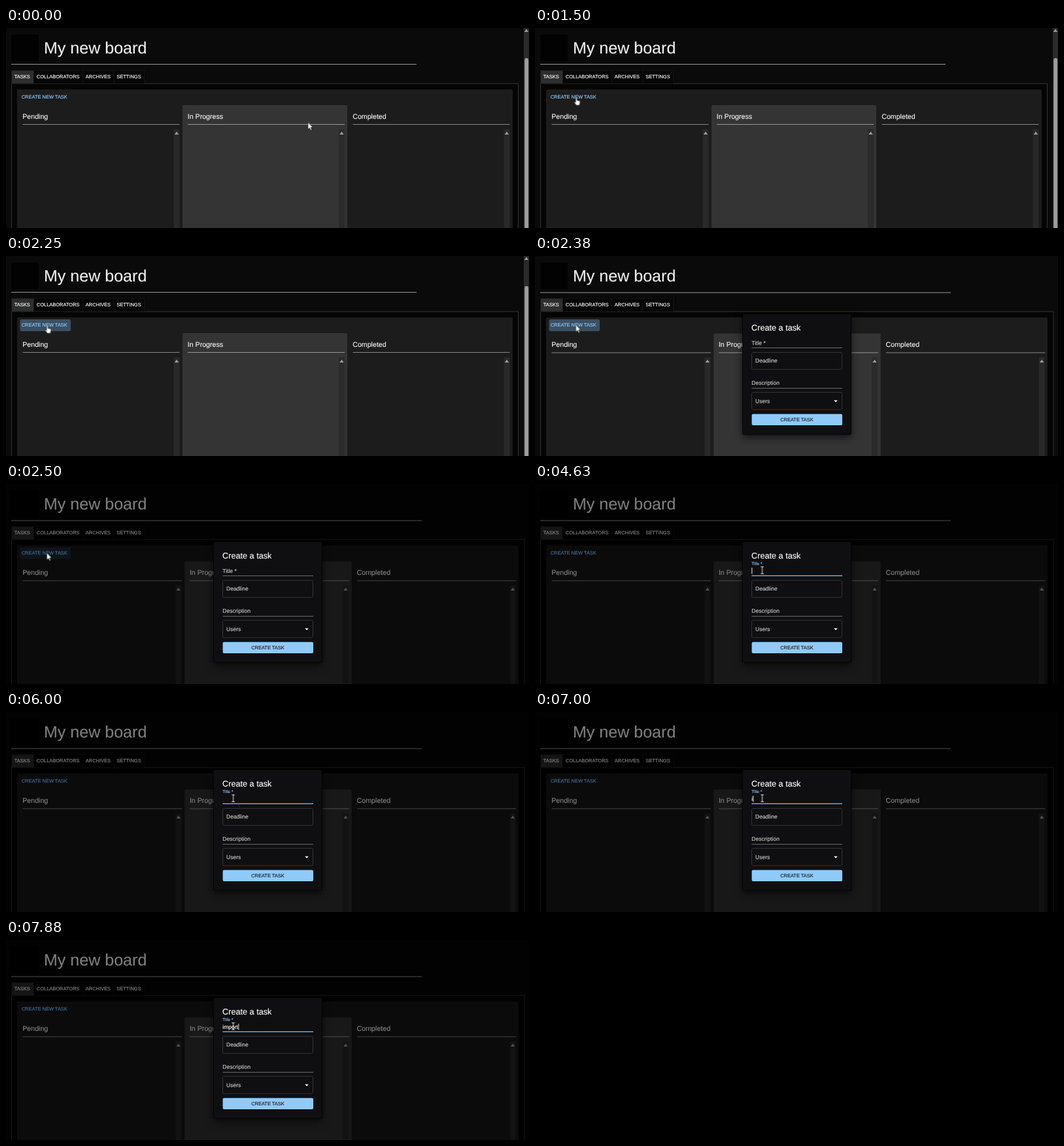
Animation, 800 px wide and 306 px high, one loop 8000 ms. Source, as an HTML page:

```html
<!DOCTYPE html>
<html lang="en">
<head>
<meta charset="utf-8">
<title>Task board</title>
<style>
html, body { margin: 0; width: 100%; height: 100%; overflow: hidden; background: #0a0a0a; }
svg { display: block; width: 800px; height: 306px; }
text {
  font-family: "Liberation Sans", Arial, sans-serif; font-size: 8.53px; color: #c8c8c8;
  fill: currentColor; stroke: currentColor; stroke-width: .15px;
  text-rendering: geometricPrecision; white-space: pre;
}
.h3 { font-size: 25.05px; color: #f0f0f0; }
.h5 { font-size: 12.7px; color: #fff; }
.h6 { font-size: 10.67px; color: #f4f4f4; }
.caps { font-size: 7.47px; color: #fff; }
.typed { color: #fff; }
.link { color: #90caf9; }
.dark { color: #15202a; }
.rule { fill: #858585; }
.box { fill: none; stroke: #353536; }

.anim, .anim * { animation: 8s step-end infinite; }
#page { animation-name: dim; }
#narrow { animation-name: narrow; }
#wide, #dialog { animation-name: wide; }
#glow { animation-name: glow; }
#dialog > .sheet { filter: drop-shadow(0 4px 6px rgba(0, 0, 0, .65)); }
#label { animation-name: label; animation-timing-function: linear; }
#focus { animation-name: focus; animation-timing-function: ease-out; transform-origin: 400.5px 140px; }
#typing { animation-name: typing; }
#caret { animation-name: caret; }
#pointer { animation-name: pointer; }
#arrow { animation-name: arrow; }
#hand { animation-name: hand; }
#beam { animation-name: beam; }

@keyframes narrow { 0% { opacity: 1 } 29.68%, 100% { opacity: 0 } }
@keyframes wide { 0% { opacity: 0 } 29.68%, 100% { opacity: 1 } }
@keyframes glow {
  0% { opacity: 0 } 23.43% { opacity: .3 } 25% { opacity: .6 } 26.56% { opacity: .85 }
  28.12% { opacity: 1 } 31.25% { opacity: .35 } 35.93%, 100% { opacity: 0 }
}
@keyframes dim {
  0% { filter: none }
  31.25%, 100% { filter: brightness(.52) contrast(1.03) saturate(1.4) }
}
@keyframes label {
  0%, 53.1% { transform: translate(331.3px, 135.7px) scale(1); color: #c8c8c8 }
  55.5%, 100% { transform: translate(331.3px, 124.4px) scale(.75); color: #90caf9 }
}
@keyframes focus { 0%, 53.1% { transform: scaleX(0) } 55.5%, 100% { transform: scaleX(1) } }
@keyframes typing {
  0% { transform: none }
  87.5% { transform: translateX(1.9px) }
  90.62% { transform: translateX(9px) }
  92.18% { transform: translateX(13.7px) }
  93.75% { transform: translateX(18.5px) }
  95.31% { transform: translateX(21.3px) }
  96.87%, 100% { transform: translateX(23.9px) }
}
@keyframes caret {
  0% { opacity: 0 } 53.12% { opacity: 1 } 59.37% { opacity: 0 } 65.62% { opacity: 1 }
  71.87% { opacity: 0 } 78.12% { opacity: 1 } 84.37% { opacity: 0 } 87.5%, 100% { opacity: 1 }
}
@keyframes pointer {
  0% { transform: translate(462px, 144.5px) }
  1.56% { transform: translate(444px, 149px) }
  3.12% { transform: translate(388px, 150px) }
  4.68% { transform: translate(296px, 143px) }
  6.25% { transform: translate(194px, 130px) }
  7.81% { transform: translate(114px, 117px) }
  9.37% { transform: translate(72px, 109px) }
  10.93% { transform: translate(62.5px, 106.5px) }
  29.68% { transform: translate(62.5px, 105.5px) }
  34.37% { transform: translate(72px, 107px) }
  35.93% { transform: translate(115px, 111px) }
  37.5% { transform: translate(185px, 118px) }
  39.06% { transform: translate(262px, 125px) }
  40.62% { transform: translate(322px, 131px) }
  42.18% { transform: translate(352px, 134px) }
  43.75% { transform: translate(350px, 133px) }
  46.87%, 100% { transform: translate(347.6px, 132px) }
}
@keyframes arrow { 0% { opacity: 1 } 9.37% { opacity: 0 } 29.68% { opacity: 1 } 42.18%, 100% { opacity: 0 } }
@keyframes hand { 0% { opacity: 0 } 9.37% { opacity: 1 } 29.68%, 100% { opacity: 0 } }
@keyframes beam { 0% { opacity: 0 } 42.18%, 100% { opacity: 1 } }
</style>
</head>
<body>
<svg viewBox="0 0 800 306" class="anim">
  <g id="page">
    <g id="narrow"></g>
    <g id="wide"></g>
    <g id="glow">
      <rect x="21.5" y="97" width="77.5" height="18" rx="2" fill="#3b4f61"/>
      <text class="caps link" x="23.7" y="108.4">CREATE NEW TASK</text>
    </g>
  </g>

  <g id="dialog">
    <rect class="sheet" x="317.5" y="88.5" width="166" height="184.5" rx="2" fill="#0f0f11" stroke="#040405"/>
    <text class="h5" x="331" y="114.2">Create a task</text>

    <text class="typed" x="331.3" y="135.7">import</text>
    <g id="typing">
      <rect x="331.1" y="126" width="30" height="12.5" fill="#0f0f11"/>
      <rect id="caret" x="331.4" y="128" width=".9" height="9.6" fill="#fff"/>
    </g>
    <text id="label">Title *</text>
    <rect class="rule" x="331.5" y="140" width="138.5" height=".8"/>
    <rect id="focus" x="331.5" y="139.8" width="138.5" height="1.1" fill="#90caf9"/>

    <rect class="box" x="331.5" y="147.5" width="138" height="26" rx="2"/>
    <text x="337" y="162.8">Deadline</text>
    <text x="331.3" y="197.2">Description</text>
    <rect class="rule" x="331.5" y="201.9" width="138.5" height=".8"/>
    <rect class="box" x="331.5" y="208.5" width="138" height="26.5" rx="2"/>
    <text x="337" y="224.7">Users</text>
    <path d="M457.2 220.8h5.6l-2.8 2.9z" fill="#fff"/>
    <rect x="331.6" y="241.7" width="138.4" height="17.2" rx="2" fill="#90caf9"/>
    <text class="caps dark" x="400.5" y="252.8" text-anchor="middle">CREATE TASK</text>
  </g>

  <g id="pointer">
    <path id="arrow" d="M0 0V10.5L2.5 8.2 4.2 12 5.8 11.3 4.1 7.6H7.3Z" fill="#fff" stroke="#000" stroke-width=".5"/>
    <path id="hand" d="M-.2.8a1 1 0 0 1 2 0V4.2l3.6.7q1.2.3 1 1.6L6 9.2 5.4 11.7H.8L-2.4 7.4q.2-1.2 1.4-.7l.8.8Z" fill="#fff" stroke="#000" stroke-width=".5"/>
    <path id="beam" d="M-2.3-5.2H2.3M0-5V5M-2.3 5.2H2.3" fill="none" stroke="#e8e8e8"/>
  </g>
</svg>
<script>
const rect = (x, y, w, h, fill, extra = '') =>
  `<rect x="${x}" y="${y}" width="${w}" height="${h}" fill="${fill}" ${extra}/>`;
const text = (x, y, cls, str) => `<text class="${cls}" x="${x}" y="${y}">${str}</text>`;
const upArrow = (x, y) => `<path d="M${x - 3.2} ${y}h6.4l-3.2-4.4z" fill="#9c9c9c"/>`;

// Tabs: label, left edge, right edge
const tabs = [['TASKS', 8, 42], ['COLLABORATORS', 42, 117], ['ARCHIVES', 117, 164.5], ['SETTINGS', 164.5, 211]];

function tab([label, left, right], i, dy) {
  return rect(left + .5, 65, right - left, 20, i ? '#060606' : '#2e2e2f', 'stroke="#181818" stroke-width=".8"') +
    text(left + 4.8, 76.6 + dy, 'caps', label);
}

function column(title, i, d) {
  const x = 25.5 + i * (252.5 + 3.2 * d), w = 240 + 3.5 * d, y = d / 2;
  const barX = x + w - 9 - .7 * d;
  const active = i === 1;
  return (active ? rect(x - 8, 118 + y, w + 12, 200, '#343435', 'rx="2"') : '') +
    text(x - .3, 138.6 + y, 'h6', title) +
    rect(x, 147 + y, w, .9, active ? '#a4a4a4' : '#949494') +
    rect(barX, 155, 9, 151, active ? '#2b2b2c' : '#292929') +
    upArrow(barX + 4.5, 163);
}

// d = 0 with the page scrollbar, d = 1 without it
function board(d) {
  const dy = d / 2;
  return rect(8, 10, 42, 41, '#020202', 'rx="2"') +
    text(58, 38.6 + dy, 'h3', 'My new board') +
    rect(8, 55 + dy, 620 + 8 * d, 1, '#969696') +
    rect(8.5, 85, 775 + 9.5 * d, 240, '#050505', 'stroke="#3a3a3a" stroke-width=".9"') +
    tabs.map((t, i) => tab(t, i, dy)).join('') +
    rect(17, 94, 758 + 9 * d, 220, '#1c1c1d', 'rx="2"') +
    text(23.7, 107.9 + dy, 'caps link', 'CREATE NEW TASK') +
    ['Pending', 'In Progress', 'Completed'].map((t, i) => column(t, i, d)).join('') +
    (d ? '' : rect(792, 0, 8, 306, '#2a2a2a') + upArrow(796, 6) + rect(793.3, 46, 5.8, 280, '#9e9e9e', 'rx="2.9"'));
}

const fillBoard = (id, d) => {
  document.getElementById(id).innerHTML = rect(0, 0, 800, 306, '#0a0a0a') + board(d);
};
fillBoard('narrow', 0);
fillBoard('wide', 1);
</script>
</body>
</html>
```
